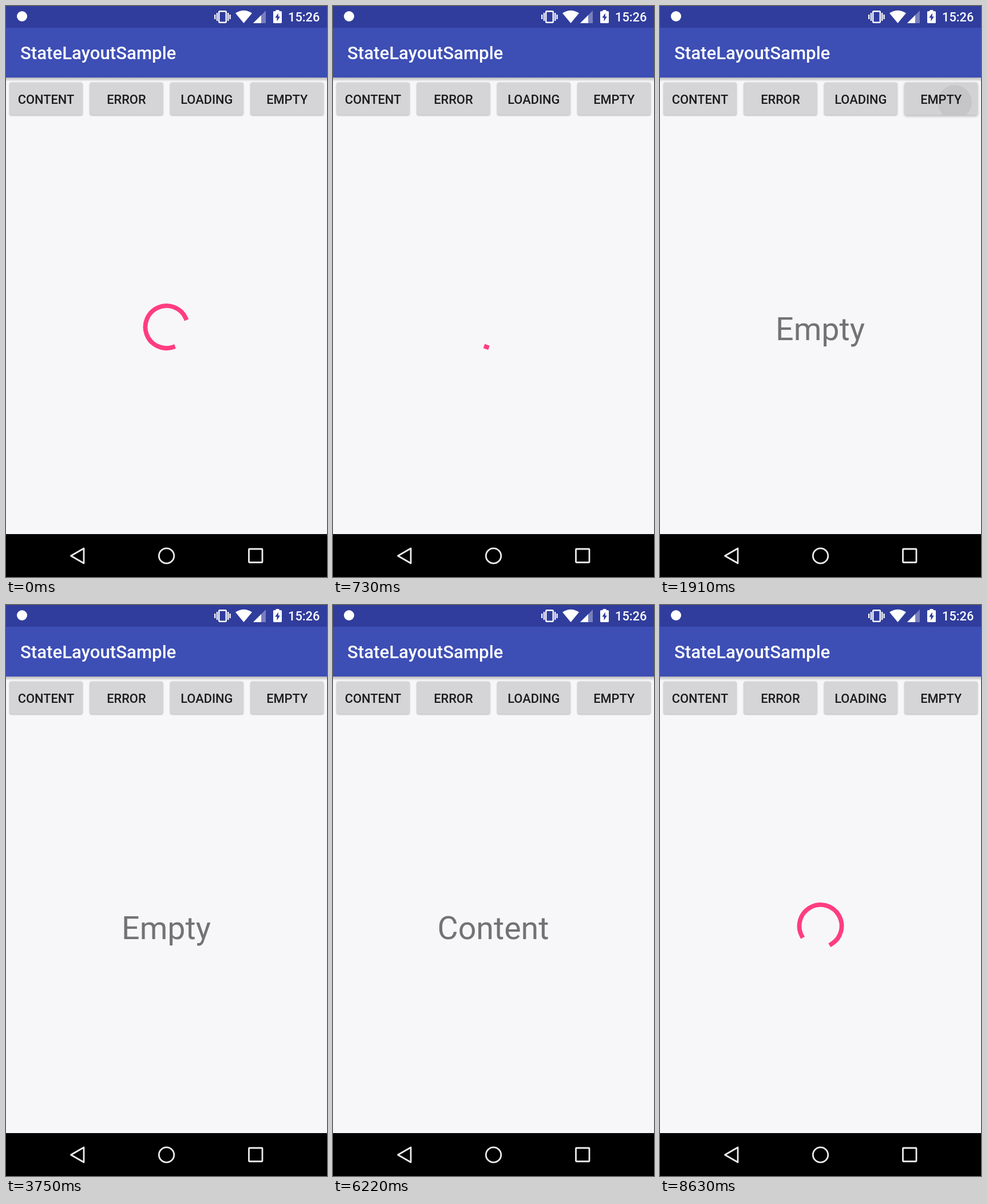
Animation of 561 by 998 pixels, one loop 8650 ms. Source, as an HTML page:

```html
<!DOCTYPE html>
<html lang="en">
<head>
<meta charset="utf-8">
<title>StateLayoutSample</title>
<style>
  html, body { margin: 0; width: 100%; height: 100%; overflow: hidden; background: #f7f7f9; }
  svg { display: block; width: 561px; height: 998px; font-family: Roboto, sans-serif; }
  .label { font-size: 21.8px; font-weight: 500; }
</style>
</head>
<body>
<svg viewBox="0 0 561 998">
  <defs>
    <linearGradient id="shade" x2="0" y2="1">
      <stop stop-color="#000" stop-opacity=".26"/>
      <stop offset="1" stop-color="#000" stop-opacity="0"/>
    </linearGradient>
  </defs>
  <rect width="561" height="998" fill="#f7f7f9"/>

  <rect y="125" width="561" height="7" fill="url(#shade)"/>
  <rect y="37" width="561" height="88" fill="#3d4eb5"/>
  <rect width="561" height="38" fill="#303d9c"/>
  <text x="25" y="93" font-size="31.2" font-weight="500" fill="#fff">StateLayoutSample</text>

  <g fill="#fff">
    <circle cx="28" cy="18" r="9"/>
    <rect x="372.2" y="9.2" width="12.6" height="19.6" rx="1.5" fill="none" stroke="#fff" stroke-width="2.4"/>
    <path d="M364 15h2.3v8H364zM367.8 12h2.3v14h-2.3zM387 12h2.3v14H387zM390.4 15h2.3v8h-2.3z"/>
    <path d="M401 12.5Q415.500 3 430 12.500L415.500 30Z"/>
    <path d="M454 8V30H432Z" opacity=".35"/>
    <path d="M446 16V30H432Z"/>
    <path d="M467 10.500q0-1.500 1.500-1.500H471.500V7h6v2h3q1.500 0 1.500 1.500V28.500q0 1.500-1.500 1.500H468.500q-1.500 0-1.500-1.500Z"/>
    <path d="M475.800 12.500L470.300 20.500H473.500V26.800L478.900 18.500H475.800Z" fill="#303d9c"/>
    <text class="label" x="493" y="27">15:26</text>
  </g>

  <g id="buttons"></g>
  <text id="message" x="280" y="583.500" font-size="55.500" text-anchor="middle" fill="#737375"></text>
  <path id="spinner" fill="none" stroke="#ff3d7f" stroke-width="7.800" stroke-linecap="square"/>

  <rect y="923" width="561" height="75"/>
  <g fill="none" stroke="#ededed" stroke-width="2.800">
    <path d="M113.500 961L136 948V974Z" stroke-linejoin="round"/>
    <circle cx="280.500" cy="961" r="13.200"/>
    <rect x="424.500" y="949" width="23.500" height="23.500" rx="1"/>
  </g>
</svg>
<script>
const LOOP = 8650, CYCLE = 1333, SWITCH_DELAY = 107;
const $ = id => document.getElementById(id);
const clamp = x => Math.min(1, Math.max(0, x));

const buttons = ['CONTENT', 'ERROR', 'LOADING', 'EMPTY'].map((label, i) => {
  const x = 6 + 140.4 * i;
  const box = `x="${x}" y="133.500" width="128" height="57" rx="3.500"`;
  $('buttons').insertAdjacentHTML('beforeend', `<g>
    <clipPath id="clip${i}"><rect ${box}/></clipPath>
    <rect ${box} fill="#d5d5d7"/>
    <rect ${box}/>
    <circle clip-path="url(#clip${i})"/>
    <text class="label" x="${x + 64}" y="170.500" text-anchor="middle" fill="#1c1c1e">${label}</text></g>`);
  const [face, tint] = $('buttons').lastChild.querySelectorAll(':scope > rect');
  return { x, face, tint, wave: $('buttons').lastChild.querySelector('circle') };
});

// Press times; each one switches the state shortly after
const presses = [
  { at: 1780, button: 3, text: 'Empty' },
  { at: 3750, button: 1, text: 'Error' },
  { at: 5310, button: 0, text: 'Content' },
  { at: 6620, button: 2, text: '' }
];

// Cubic curve through (0,0) (.2,0) (.1,1) (.5,1)
function ease(x) {
  if (x <= 0) return 0;
  if (x >= .5) return 1;
  let lo = 0, hi = 1;
  for (let i = 0; i < 24; i++) {
    const s = (lo + hi) / 2, r = 1 - s;
    if (.6 * s * r * r + .3 * s * s * r + .5 * s ** 3 < x) lo = s; else hi = s;
  }
  return lo * lo * (3 - 2 * lo);
}

function drawSpinner(time, angle) {
  const p = time / CYCLE, n = Math.floor(p), u = p - n;
  const base = angle + 234 * p + 270 * n;
  const from = base + 270 * ease(u - .5);
  const to = Math.max(base + 270 * ease(u), from + .5);
  const point = deg => {
    const a = deg * Math.PI / 180;
    return `${280.5 + 37 * Math.sin(a)} ${561 - 37 * Math.cos(a)}`;
  };
  $('spinner').setAttribute('d', `M${point(from)}A37 37 0 ${to - from > 180 ? 1 : 0} 1 ${point(to)}`);
}

function drawButton(b, age) {
  const lift = clamp(age / 100) * clamp((450 - age) / 150);
  const fade = clamp(age / 120) * clamp((600 - age) / 400);
  const grow = clamp((age - 50) / 190);
  b.face.style.filter = `drop-shadow(0 ${1 + lift}px ${1.3 + lift}px rgba(0,0,0,.28))`;
  b.tint.setAttribute('opacity', .06 * clamp((age - 60) / 300) * clamp((750 - age) / 350));
  b.wave.setAttribute('cx', b.x + 64 + 25 * (1 - grow * .1));
  b.wave.setAttribute('cy', 168);
  b.wave.setAttribute('r', grow * 70 + clamp((age - 240) / 100) * 25);
  b.wave.setAttribute('opacity', .06 * fade);
}

function draw(now) {
  const t = now % LOOP;
  const state = presses.filter(p => t >= p.at + SWITCH_DELAY).pop();
  const text = state ? state.text : '';
  $('message').textContent = text;
  $('spinner').style.display = text ? 'none' : '';
  if (!state) drawSpinner(t + 526.5, 69.6);
  else if (!text) drawSpinner(t - state.at - SWITCH_DELAY, -2);
  buttons.forEach((b, i) => drawButton(b, t - presses.find(p => p.button === i).at));
  requestAnimationFrame(draw);
}
draw(performance.now());
</script>
</body>
</html>
```
